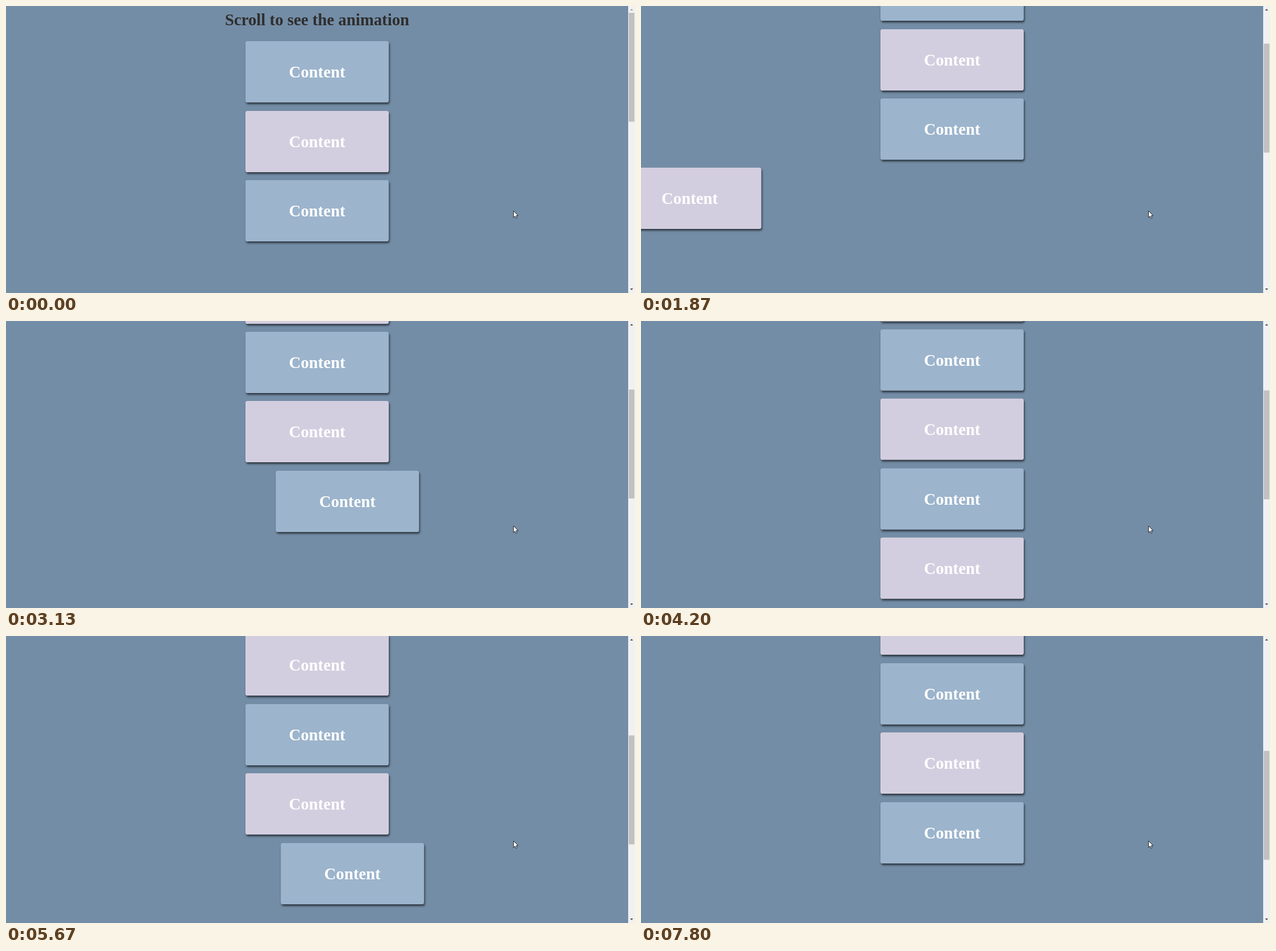
An HTML page for the animation above (8000 ms loop, 1106 by 506 pixels).

```html
<!DOCTYPE html>
<html lang="en">
<head>
<meta charset="utf-8">
<title>Scroll animation</title>
<style>
  @property --scroll { syntax: "<number>"; inherits: true; initial-value: 0; }

  html, body { margin: 0; width: 100%; height: 100%; overflow: hidden; }

  .stage {
    position: relative;
    width: 1106px;
    height: 506px;
    overflow: hidden;
    background: #748da6;
    font: bold 28.8px/33px "Liberation Serif", "Times New Roman", serif;
    text-align: center;
    animation: scroll 8s ease-in-out infinite;
  }

  .page {
    position: absolute;
    inset: 0 12px 0 0;
    transform: translateY(calc(var(--scroll) * -1px));
  }
  h1 {
    position: absolute;
    top: 7.6px;
    width: 100%;
    margin: 0;
    font: inherit;
    color: #2e2e2e;
  }
  .card {
    position: absolute;
    left: 421px;
    top: calc(62.2px + var(--i) * 122.4px);
    width: 252px;
    height: 108px;
    line-height: 108px;
    border-radius: 3.6px;
    color: #fff;
    background: #9cb4cc;
    box-shadow: 1.44px 2.88px 3.6px rgba(0, 0, 0, .6);
    --away: 1008px;
    animation: 8s ease infinite;
  }
  .card:nth-of-type(even) { background: #d3cedf; --away: -1008px; }

  .bar { position: absolute; right: 0; top: 0; width: 12px; height: 100%; background: #f1f1f1; }
  .thumb {
    position: absolute;
    left: 1px;
    top: 12px;
    width: 10px;
    height: 192px;
    background: #c1c1c1;
    transform: translateY(calc(var(--scroll) * .378px));
  }
  svg { position: absolute; inset: 0; }
  .up { animation: enable 8s step-end infinite; }

  /* Wheel movements, in pixels from the top of the page */
  @keyframes scroll {
    0%, 17.125% { --scroll: 0; }
    21.25%, 32.125% { --scroll: 144; }
    36.125%, 52.09% { --scroll: 288; }
    54.59%, 62.96% { --scroll: 360; }
    65.5%, 75.56% { --scroll: 432; }
    79.56%, 92.96% { --scroll: 576; }
    95.46%, 100% { --scroll: 504; }
  }
  @keyframes enable {
    0% { fill: #a3a3a3; }
    17.4%, 100% { fill: #505050; }
  }

  /* Cards slide in as they pass the trigger line */
  @keyframes slide3 {
    0%, 21.025% { transform: translateX(var(--away)); }
    28.525%, 100% { transform: translateX(0); }
  }
  @keyframes slide4 {
    0%, 33.775% { transform: translateX(var(--away)); }
    41.275%, 100% { transform: translateX(0); }
  }
  @keyframes slide5 {
    0%, 38.05% { transform: translateX(var(--away)); }
    45.55%, 100% { transform: translateX(0); }
  }
  @keyframes slide6 {
    0%, 64.375% { transform: translateX(var(--away)); }
    73.75%, 100% { transform: translateX(0); }
  }
  /* The last card leaves again; its curve is the visible first part of "ease" */
  @keyframes slide7 {
    0%, 80.55% { transform: translateX(var(--away)); }
    88.05% { transform: translateX(0); }
    94.44% { transform: translateX(0); animation-timing-function: cubic-bezier(.379, .089, .533, .601); }
    97.39%, 100% { transform: translateX(-680px); }
  }
</style>
</head>
<body>
<div class="stage">
  <main class="page">
    <h1>Scroll to see the animation</h1>
    <div class="card" style="--i: 0">Content</div>
    <div class="card" style="--i: 1">Content</div>
    <div class="card" style="--i: 2">Content</div>
    <div class="card" style="--i: 3; animation-name: slide3">Content</div>
    <div class="card" style="--i: 4; animation-name: slide4">Content</div>
    <div class="card" style="--i: 5; animation-name: slide5">Content</div>
    <div class="card" style="--i: 6; animation-name: slide6">Content</div>
    <div class="card" style="--i: 7; animation-name: slide7">Content</div>
  </main>
  <div class="bar"><div class="thumb"></div></div>
  <svg width="1106" height="506">
    <path class="up" d="M1097.3 8 l2.7 -3 2.7 3z"/>
    <path fill="#505050" d="M1097.3 498 l2.7 3 2.7 -3z"/>
    <path transform="translate(892.4 361.2)" fill="#fff" stroke="#000" stroke-width=".8"
          d="M0 0 V11.8 L2.7 9.3 4.4 13.2 6.2 12.4 4.5 8.5 H8.2Z"/>
  </svg>
</div>
</body>
</html>
```
